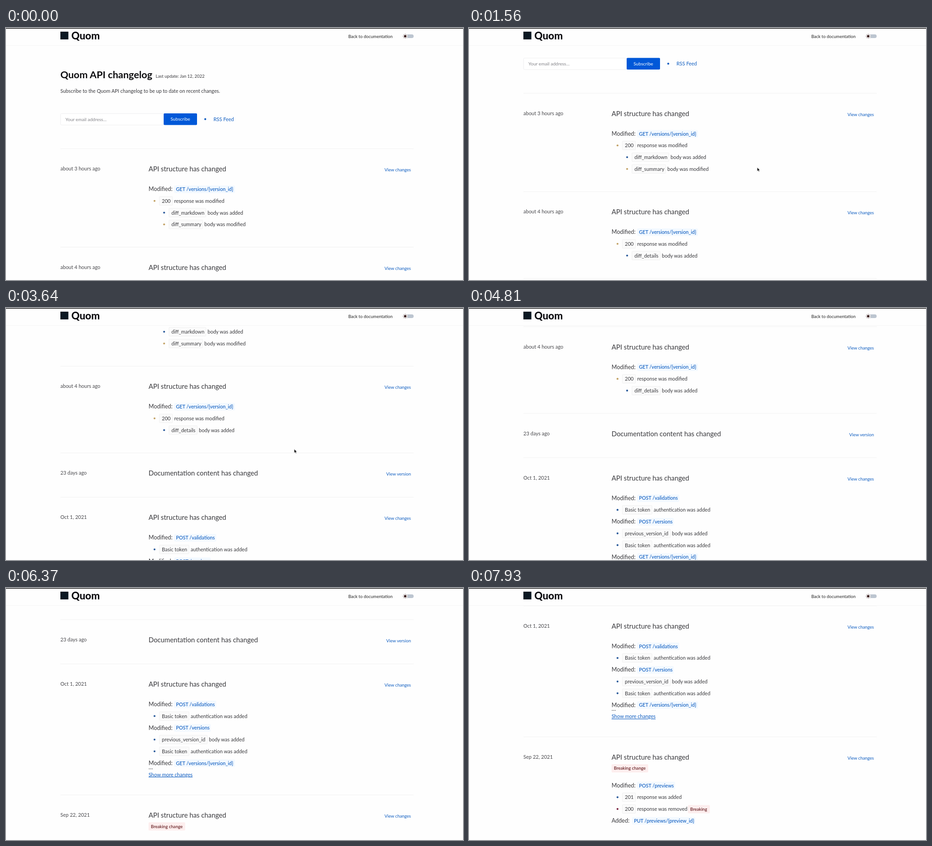
Recreate the animation shown at these times as an HTML page. Size 1000 px wide and 552 px high, loop 8 s.

```html
<!DOCTYPE html>
<html lang="en">
<head>
<meta charset="utf-8">
<title>API changelog</title>
<style>
  html, body { margin: 0; width: 100%; height: 100%; overflow: hidden; background: #fefefe; }
  svg { display: block; width: 1000px; height: 552px; font-family: Lato, "Open Sans", sans-serif; }
</style>
</head>
<body>
<svg viewBox="0 0 1000 552">
  <g id="page"></g>
  <g id="header"></g>
  <path id="cursor" d="M0 0V8.2L2 6.5L3.4 9.3L4.8 8.6L3.5 5.9H6Z" fill="#111" stroke="#fff" stroke-width=".6"/>
</svg>
<script>
const BLUE = '#0d5cc0', INK = '#38383c', STEP = 130, LOOP = 8000;
const page = document.getElementById('page');
const header = document.getElementById('header');
const cursor = document.getElementById('cursor');

function add(parent, tag, attrs, content = '') {
  const node = document.createElementNS('http://www.w3.org/2000/svg', tag);
  for (const key in attrs) node.setAttribute(key, attrs[key]);
  node.textContent = content;
  parent.append(node);
}
// y is the middle of the capital letters
function text(parent, x, y, content, size, fill = INK, more = {}) {
  add(parent, 'text', { x, y: y + size * .35, 'font-size': size, fill, ...more }, content);
}
function box(parent, x, y, width, height, fill, more = {}) {
  add(parent, 'rect', { x, y, width, height, fill, ...more });
}
function dot(parent, cx, cy, r, fill) {
  add(parent, 'circle', { cx, cy, r, fill });
}
const medium = { 'font-weight': 500 };

// Rows of an entry
const op = (label, path, width, x = 368) => y => {
  text(page, 312, y, label, 12.5);
  box(page, x, y - 8, width, 16.5, '#f3f9ff', { rx: 2 });
  text(page, x + 4, y + .3, path, 10.7, BLUE, medium);
};
const DOTS = { added: '#2c5c9c', modified: '#c3a266', removed: '#7c2440' };
const item = (level, code, width, what, change, breaking) => y => {
  const x = 335 + level * 21;
  dot(page, x - 10, y, 2.1, DOTS[change]);
  box(page, x + .5, y - 9.5, width - 1, 19, '#fbfbfb', { rx: 1.5, stroke: '#f0f0f0' });
  text(page, x + 6, y + .2, code, 11);
  text(page, x + width + 3, y + .2, `${what} was ${change}`, 11);
  if (breaking) badge(479, y + .5, 48, 'Breaking');
};
function badge(x, y, width, label) {
  box(page, x, y - 9, width, 18, '#fdeeee', { rx: 2 });
  text(page, x + 5, y, label, 9.6, '#5c1216', medium);
}

function entry(top, date, title, link, rows = [], rowsTop = 88.5) {
  box(page, 119, top - .5, 773, 1, '#f2f2f2');
  text(page, 119, top + 44, date, 11, '#48484c');
  text(page, 312, top + 44.5, title, 14.8);
  text(page, 886, top + 46.3, link, 9.6, BLUE, { 'text-anchor': 'end' });
  rows.forEach((row, i) => row(top + rowsTop + i * 25.75));
}

const CHANGED = 'API structure has changed';
const version = op('Modified:', 'GET /versions/{version_id}', 133);
const status = item(0, '200', 30, 'response', 'modified');
const token = item(0, 'Basic token', 66, 'authentication', 'added');

text(page, 119, 102, 'Quom API changelog', 21.5, '#0c0c0f', { 'font-weight': 700 });
text(page, 327.5, 105.5, 'Last update: Jan 12, 2022', 9.5);
text(page, 119, 138, 'Subscribe to the Quom API changelog to be up to date on recent changes.', 10.8);
box(page, 119.5, 187.5, 226, 25, '#fff', { rx: 2, stroke: '#efeff0' });
text(page, 130, 200, 'Your email address…', 10.1, '#85858a');
box(page, 345, 187, 73, 25.5, '#0058d8', { rx: 2 });
text(page, 360, 199.7, 'Subscribe', 10.1, '#fff');
dot(page, 436, 199.7, 2.1, BLUE);
text(page, 454, 199.7, 'RSS Feed', 10.9, BLUE);

entry(264.5, 'about 3 hours ago', CHANGED, 'View changes', [
  version, status,
  item(1, 'diff_markdown', 82, 'body', 'added'),
  item(1, 'diff_summary', 75, 'body', 'modified')
]);
entry(480, 'about 4 hours ago', CHANGED, 'View changes', [
  version, status,
  item(1, 'diff_details', 63, 'body', 'added')
]);
entry(670, '23 days ago', 'Documentation content has changed', 'View version');
entry(767, 'Oct 1, 2021', CHANGED, 'View changes', [
  op('Modified:', 'POST /validations', 92), token,
  op('Modified:', 'POST /versions', 80),
  item(0, 'previous_version_id', 106, 'body', 'added'), token,
  version
]);
text(page, 312, 993, '…', 12.5);
text(page, 312, 1009.5, 'Show more changes', 11, BLUE, { 'text-decoration': 'underline' });
entry(1054, 'Sep 22, 2021', CHANGED, 'View changes', [
  op('Modified:', 'POST /previews', 83),
  item(0, '201', 30, 'response', 'added'),
  item(0, '200', 30, 'response', 'removed', true),
  op('Added:', 'PUT /previews/{preview_id}', 138, 357)
], 106.5);
badge(312, 1123, 80, 'Breaking change');

// Fixed header
box(header, 0, 0, 1000, 39, '#fefefe');
box(header, 0, 38, 1000, 1, '#f5f5f5');
box(header, 0, 0, 1000, 1.3, '#000');
box(header, 119, 8, 17.5, 17, '#0b1822');
text(header, 143, 17, 'Quom', 22.3, '#0b0b10', { 'font-weight': 800 });
text(header, 749, 18.3, 'Back to documentation', 9.5, '#222');
box(header, 876, 14, 16, 8, '#bcc5d0', { rx: 4 });
dot(header, 873.5, 18, 5.6, '#fefefe');
dot(header, 873.5, 18, 2.7, '#3a2020');
for (let i = 0; i < 8; i++) {
  const a = i * Math.PI / 4;
  dot(header, 873.5 + 4.5 * Math.cos(a), 18 + 4.5 * Math.sin(a), .65, '#4a3030');
}

// Scroll flicks: start time, number of steps, distance
const flicks = [
  [910, 6, 121.5], [1950, 9, 153], [3380, 8, 140.4],
  [4810, 9, 139], [6240, 8, 122.4], [7670, 8, 93]
];
const progress = x => Math.min(1, Math.max(0, x));

function scrollAt(time) {
  return flicks.reduce((sum, [start, steps, distance]) =>
    sum + distance * Math.sin(progress(((time - start) / STEP + 1) / steps) * Math.PI / 2), 0);
}

function draw() {
  const time = Math.floor(performance.now() % LOOP / STEP) * STEP;
  page.setAttribute('transform', `translate(0 ${-scrollAt(time)})`);
  const cursorY = 305.5 + 3.7 * progress((time - 1950) / 1040);
  cursor.setAttribute('transform', `translate(630.7 ${cursorY})`);
  cursor.setAttribute('visibility', time >= 910 && time < 4290 ? 'visible' : 'hidden');
  requestAnimationFrame(draw);
}
draw();
</script>
</body>
</html>
```
